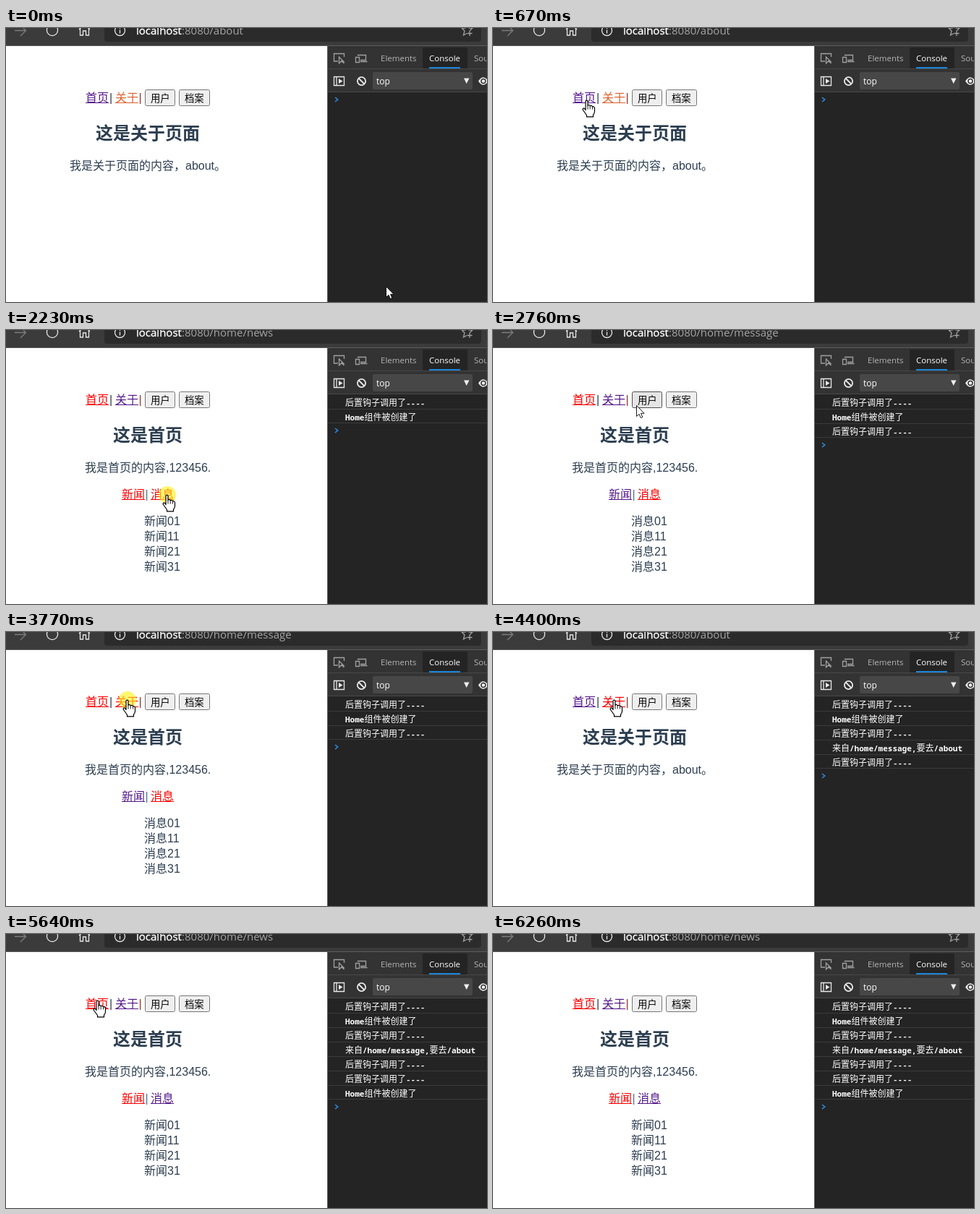
Recreate the animation shown at these times as an HTML page. Size 665 by 379 pixels, loop 7120 ms.

```html
<!DOCTYPE html>
<html lang="zh">
<head>
<meta charset="utf-8">
<title>Router demo</title>
<style>
html, body { margin: 0; width: 100%; height: 100%; overflow: hidden; background: #fff; }
svg { display: block; width: 665px; height: 379px; }
text { white-space: pre; }
.page { font: 16px "Liberation Sans", "Noto Sans CJK SC", "Noto Sans CJK", sans-serif; fill: #2c3e50; }
.title { font-size: 24px; font-weight: 700; }
.btn { font-size: 13.333px; fill: #000; }
.ui { font: 11.5px "Open Sans", "Noto Sans", sans-serif; fill: #b4b4b4; }
.url { font-size: 15px; fill: #a5a5a5; }
.log { font: 12px "Noto Sans CJK SC", "Noto Sans CJK", sans-serif; fill: #fff; }
.mono { font: 600 11px "Noto Sans Mono", "DejaVu Sans Mono", monospace; }
.icon { fill: none; stroke: #e8e8e8; stroke-width: 1.3; }
.dim { stroke: #a0a0a0; }
.off { stroke: #7c7c7c; }
</style>
</head>
<body>
<svg id="stage" viewBox="0 0 665 379"></svg>
<script>
const LOOP = 7120;
const RED = '#f00', VISITED = '#551a8b', ORANGE = '#dc6432', EDGE = '#5c5c5c';

const text = (x, y, s, cls = '', more = '') => `<text x="${x}" y="${y}" class="${cls}" ${more}>${s}</text>`;
const rect = (x, y, w, h, fill, more = '') =>
  `<rect x="${x}" y="${y}" width="${w}" height="${h}" fill="${fill}" ${more}/>`;
const icon = (d, cls = '') => `<path class="icon ${cls}" d="${d}"/>`;
const link = (id, x, y, s) => `<g id="${id}">${text(x, y, s)}<rect x="${x}" y="${y + 1}" width="32" height="1"/></g>`;
const button = (id, x, w, s) =>
  rect(x + .5, 85.5, w - 1, 22, '#efefef', `id="${id}" rx="2" stroke="#767676"`) + text(x + 8, 102, s, 'btn');
const mixed = s => s.replace(/[ -~]+/g, m => `<tspan class="mono">${m}</tspan>`);

const logs = ['后置钩子调用了----', 'Home组件被创建了', '后置钩子调用了----',
  '来自/home/message,要去/about', '后置钩子调用了----', '后置钩子调用了----', 'Home组件被创建了'];

const page = `<g class="page">
  ${link('home', 110, 102, '首页')}${text(143, 102, '|')}
  ${link('about', 151, 102, '关于')}${text(183.5, 102, '|', '', 'style="fill:#9a3226"')}
  ${button('user', 192, 42, '用户')}${button('file', 239, 43, '档案')}
  <g id="aboutPage">${text(124, 154, '这是关于页面', 'title')}${text(88, 196, '我是关于页面的内容，about。')}</g>
  <g id="homePage">${text(148, 154, '这是首页', 'title')}${text(109, 196, '我是首页的内容,123456.')}
    ${link('news', 160, 233, '新闻')}${text(192.5, 233, '|', '', 'style="fill:#4a7396"')}
    ${link('message', 200, 233, '消息')}
    ${[0, 1, 2, 3].map(i => text(191, 270 + 21 * i, '', 'item')).join('')}
  </g></g>`;

const browser = `<g class="ui">
  ${rect(0, 0, 665, 24, '#3b3b3b')}${rect(0, 24, 665, 1, EDGE)}${rect(136, -14, 521, 33, '#2b2b2b', 'rx="4"')}
  ${icon('M12 3.5H27M20 -4l7.5 7.5L20 11', 'off')}
  <circle class="icon" cx="64" cy="3" r="7.6"/>
  ${icon('M102.5 1V10H106.5V4H110.5V10H114.5V1M101 2L108.5 -5L116 2')}
  <circle class="icon" cx="157.5" cy="3.5" r="7"/>${icon('M157.5 2.5V7.5M157.5 -.5V1')}
  ${icon('M630 0H635L637.5 -5L640 0H645L641 4M630 0L634 4L632.5 10L637 7.5M641 4V11M637.5 7.5H644.5', 'dim')}
  ${text(180, 9, 'localhost', 'url', 'style="fill:#fff;stroke:#fff;stroke-width:.35px"')}
  ${text(243, 9, '', 'url', 'id="path"')}</g>`;

const devtools = `<g class="ui">
  ${rect(444, 25, 221, 354, '#242424')}${rect(444, 25, 221, 63, '#333')}
  ${rect(576, 27, 62, 29, '#242424')}${rect(444, 56, 221, 1, '#484848')}${rect(444, 88, 221, 1, '#484848')}
  ${rect(444, 25, 1, 354, EDGE)}${rect(585, 54, 43, 2, '#1a86d9')}
  ${text(518, 46, 'Elements')}${text(585, 46, 'Console', '', 'style="fill:#fff"')}${text(647, 46, 'Sou')}
  ${icon('M459 46H453.5V35.5H467.5V40M460.5 40V49L463 46.5H467ZM463.5 45L467.5 49', 'dim')}
  ${icon('M486.5 38.5V37.5H497.5V44.5H490M490 46.5H499.5M483.5 40.5H488.5V47.5H483.5Z', 'dim')}
  ${icon('M453.5 67.5H467.5V79.5H453.5ZM457 67.5V79.5')}
  <path d="M460 70L465.5 73.5L460 77Z" fill="#e8e8e8"/>
  <g class="icon" style="stroke-width:1.8"><circle cx="491.5" cy="73.5" r="5.6"/><path d="M487.5 69.5L495.5 77.5"/></g>
  ${rect(507, 61, 138, 24, '#474747', 'rx="2"')}${text(512, 78, 'top', '', 'style="fill:#fff;font-size:12px"')}
  <path d="M633 69.5H640.5L636.7 77Z" fill="#f0f0f0"/>
  <path d="M653 73.5Q660 63 667 73.5Q660 84 653 73.5Z" fill="#f0f0f0"/>
  <circle cx="660" cy="73.5" r="3" fill="#f0f0f0" stroke="#333" stroke-width="1.5"/>
  </g><g class="log">
  ${logs.map((s, i) => `<g class="row">${text(469, 104.5 + 20 * i, mixed(s))}${rect(445, 109 + 20 * i, 220, 1, '#3a3a3a')}</g>`).join('')}
  <path id="prompt" d="M455 -3L458.7 0L455 3" fill="none" stroke="#2f8ade" stroke-width="1.6"/></g>`;

const pointer = `<circle id="spot" r="12" fill="#fff01c" opacity=".62"/>
  <g id="cursor" fill="#fff" stroke="#000" stroke-linejoin="round">
  <path id="arrow" d="M.5 .5V15.5L4 12.3L6.3 17.5L8.8 16.4L6.5 11.3H11Z" stroke-width=".9"/>
  <g id="hand" transform="translate(-.5 -.5)">
  <path stroke-width="1.2" d="M-1.5 14V2Q-1.5 .6 0 .6T1.5 2V8Q2 6.7 3.3 7T4.7 8.6Q5.4 7.5 6.7 8T8 9.6Q8.8 8.7 10 9.4T11 11.5V16Q11 18.5 9 20.5V23.4H0V21L-4.7 14.5Q-6 12.5 -4.8 11.7T-2.5 12.6Z"/>
  <path d="M1.5 8V13M4.7 9V13M8 10V13" fill="none" stroke-width=".9"/></g></g>`;

document.getElementById('stage').innerHTML = rect(0, 0, 665, 379, '#fff') + page + browser + devtools + pointer;

const $ = id => document.getElementById(id);
const show = (el, on) => el.setAttribute('display', on ? 'inline' : 'none');
const items = [...document.querySelectorAll('.item')];
const rows = [...document.querySelectorAll('.row')];

// Each move: first step, last step, number of steps, end point, optional control point.
const moves = [
  [70, 670, 9, [130, 100]],
  [1600, 2000, 6, [223, 228]],
  [2610, 2760, 3, [198, 104]],
  [2840, 3310, 7, [168, 94], [185, 43]],
  [4790, 4860, 2, [119, 96]],
  [5100, 5180, 2, [127, 92]],
  [5940, 6180, 4, [557, 324]]
];

function cursorAt(t) {
  let p = [525, 357];
  for (const [from, to, n, end, mid] of moves) {
    if (t < from) break;
    const k = Math.min(n, 1 + Math.floor((t - from) * (n - 1) / (to - from)));
    const u = k / n, e = u * u * (3 - 2 * u);
    p = p.map((a, i) => {
      const c = mid ? mid[i] : (a + end[i]) / 2;
      return a * (1 - e) ** 2 + 2 * c * e * (1 - e) + end[i] * e * e;
    });
  }
  return p;
}

const routes = [[0, '/about'], [1300, '/home/news'], [2390, '/home/message'], [4400, '/about'], [5560, '/home/news']];
const logTimes = [1300, 1360, 2390, 4400, 4400, 5560, 5640];
const presses = [[990, 1300, 'home'], [2230, 2390, 'message'], [3700, 4400, 'about'], [5330, 5560, 'home']];
const inside = ([x, y], l, top, r, b) => x >= l && x <= r && y >= top && y <= b;

function draw(t) {
  const route = routes.filter(r => r[0] <= t).pop()[1];
  const atHome = route.startsWith('/home');
  const press = presses.find(p => t >= p[0] && t < p[1]);
  const held = press && press[2];
  const p = cursorAt(t);

  $('path').textContent = ':8080' + route;
  show($('aboutPage'), !atHome);
  show($('homePage'), atHome);
  const active = {
    home: atHome, about: !atHome,
    news: route.endsWith('news'), message: route.endsWith('message')
  };
  for (const id in active) $(id).setAttribute('fill', active[id] || held === id ? RED : VISITED);
  if (t < 1300) $('about').setAttribute('fill', ORANGE);
  items.forEach((el, i) => el.textContent = (active.news ? '新闻' : '消息') + i + '1');

  // The last row is one pixel shorter, as the rows overlap by their border.
  const count = logTimes.filter(a => a <= t).length;
  rows.forEach((el, i) => {
    show(el, i < count);
    el.lastChild.setAttribute('y', 109 + 20 * i - (i === count - 1));
  });
  $('prompt').setAttribute('transform', `translate(0 ${99 + 20 * count})`);

  for (const [id, l, r] of [['user', 192, 234], ['file', 239, 282]]) {
    const over = inside(p, l, 85, r, 108);
    $(id).setAttribute('fill', over ? '#e5e5e5' : '#efefef');
    $(id).setAttribute('stroke', over ? '#4f4f4f' : '#767676');
  }
  const onLink = inside(p, 110, 88, 142, 106) || inside(p, 151, 88, 183, 106) ||
    atHome && (inside(p, 160, 219, 192, 237) || inside(p, 200, 219, 232, 237));
  const at = `translate(${Math.round(p[0])} ${Math.round(p[1])})`;
  $('cursor').setAttribute('transform', at);
  $('spot').setAttribute('transform', at);
  show($('cursor'), t < 6260);
  show($('spot'), held);
  show($('arrow'), !onLink);
  show($('hand'), onLink);
}

const start = performance.now();
function tick() {
  draw((performance.now() - start) % LOOP);
  requestAnimationFrame(tick);
}
draw(0);
requestAnimationFrame(tick);
</script>
</body>
</html>
```
